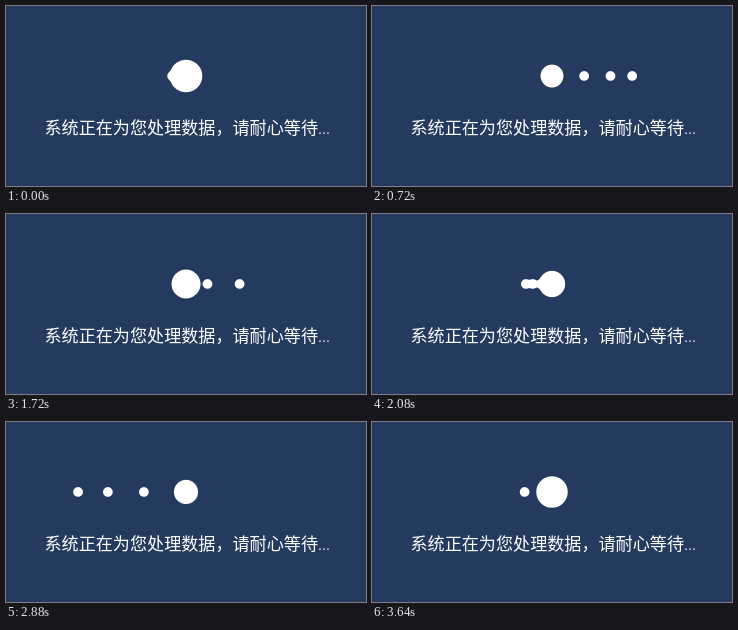
An HTML page for the animation above (3.68 s loop, 360 px wide and 180 px high).

```html
<!DOCTYPE html>
<html lang="zh-CN">
<head>
<meta charset="utf-8">
<style>
  html, body { margin: 0; width: 100%; height: 100%; overflow: hidden; background: #253a5f; }
  svg { display: block; width: 360px; height: 180px; }
  text { font: 300 17.1px Lato, "Noto Sans CJK SC", "Noto Sans CJK", sans-serif; }
</style>
</head>
<body>
<svg viewBox="0 0 360 180" fill="#fff">
  <filter id="goo" filterUnits="userSpaceOnUse" x="0" y="30" width="360" height="80" color-interpolation-filters="sRGB">
    <feGaussianBlur stdDeviation="1.3"/>
    <feColorMatrix values="1 0 0 0 0  0 1 0 0 0  0 0 1 0 0  0 0 0 3 -1"/>
  </filter>
  <g filter="url(#goo)">
    <circle id="core" cx="180" cy="70" r="11"/>
  </g>
  <text x="38.5" y="128">系统正在为您处理数据，请耐心等待...</text>
</svg>
<script>
  const LOOP = 3680, HALF = LOOP / 2, STEP = 40;
  const BACK = 440;   // quick way back after the slow way out
  const core = document.getElementById('core');

  // Dots leave together; the nearer ones turn back sooner.
  const satellites = [
    { reach: 128, out: 1400 },
    { reach: 89.5, out: 1330 },
    { reach: 45.3, out: 1200 }
  ].map(s => {
    const el = core.cloneNode();
    el.removeAttribute('id');
    el.setAttribute('r', 5);
    core.parentNode.append(el);
    return { ...s, el };
  });

  const returned = (h, out) => Math.min(1, (h - out) / BACK) ** 1.2;

  const swing = (h, out) => h < out
    ? 1 - (1 - h / out) ** 1.48
    : 1 - returned(h, out);

  function coreRadius(h) {
    const { out } = satellites[0];
    const swell = h < out ? (1 - h / out) ** 7 : returned(h, out);
    return 11.5 + 0.75 * Math.cos(4 * Math.PI * h / HALF) + 4.6 * swell;
  }

  function draw(now) {
    const t = Math.floor(now / STEP) * STEP;
    const phase = (t - 40 + LOOP) % LOOP;   // the dots start 40 ms into the loop
    const h = phase % HALF, side = phase < HALF ? 1 : -1;
    core.setAttribute('r', coreRadius(h));
    for (const { el, reach, out } of satellites)
      el.setAttribute('cx', 180 + side * reach * swing(h, out));
  }

  function tick() {
    draw(performance.now());
    requestAnimationFrame(tick);
  }
  tick();
</script>
</body>
</html>
```
